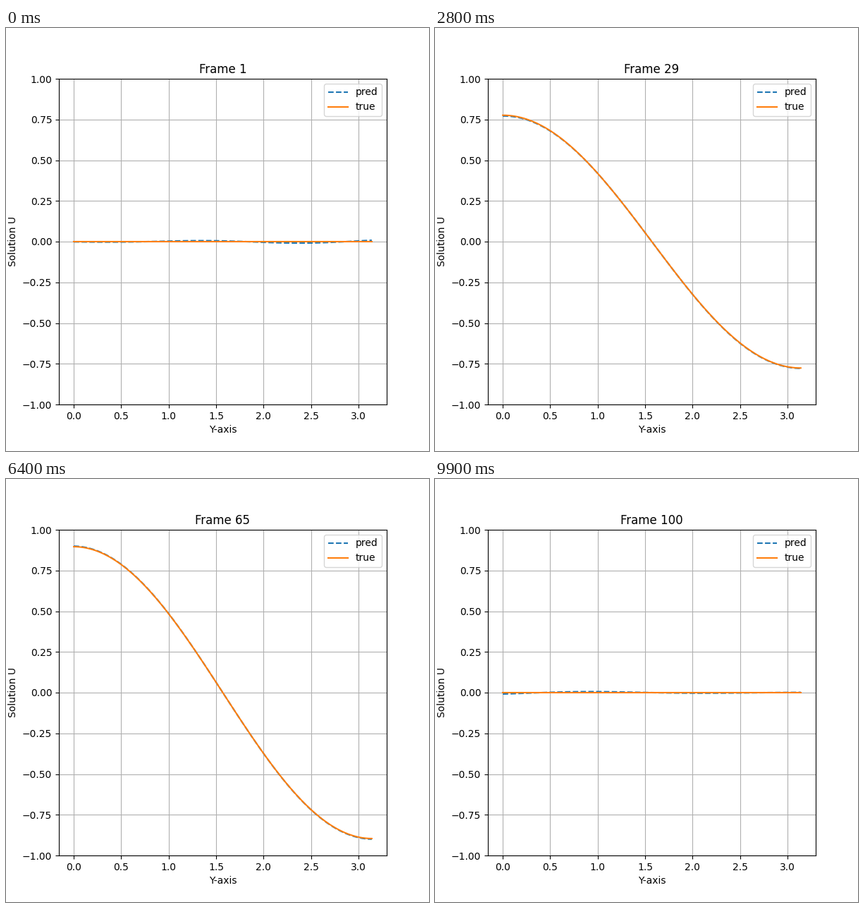
A matplotlib script for the animation above (10 s loop, 600x600 px).

```python
import numpy as np
import matplotlib.pyplot as plt
from matplotlib.animation import FuncAnimation

FRAMES = 100
INTERVAL = 100

plt.rcParams["font.family"] = "DejaVu Sans"

y = np.linspace(0, np.pi, 100)


def true_solution(t):
    return np.sin(np.pi * t) * np.cos(y)


def prediction_error(t):
    """Ripples that fade away from both ends of the loop, plus edge drift."""
    first = (0.002 + 0.003 * y) * np.sin(3 * (y - 0.77))
    last = 0.010 * np.exp(-0.5 * y) * np.sin(2.65 * (y - 0.4))
    left = -0.005 * np.sin(2 * np.pi * t) * np.exp(-2 * y)
    right = -0.005 * np.sin(np.pi * t) ** 2 * np.exp(2 * (y - np.pi))
    return first * np.exp(-8 * t) + last * np.exp(-8 * (1 - t)) + left + right


fig, ax = plt.subplots(figsize=(6, 6), dpi=100)
pred_line, = ax.plot(y, np.zeros_like(y), "--", label="pred")
true_line, = ax.plot(y, np.zeros_like(y), label="true")
ax.set_ylim(-1, 1)
ax.set_xlabel("Y-axis")
ax.set_ylabel("Solution U")
ax.grid(True)
ax.legend(loc="upper right")
title = ax.set_title("Frame 1")


def update(step):
    t = step / (FRAMES - 1)
    true = true_solution(t)
    true_line.set_ydata(true)
    pred_line.set_ydata(true + prediction_error(t))
    title.set_text(f"Frame {step + 1}")
    return pred_line, true_line, title


anim = FuncAnimation(fig, update, frames=FRAMES, interval=INTERVAL,
                     repeat=True, repeat_delay=0, blit=False)
plt.show()
```
